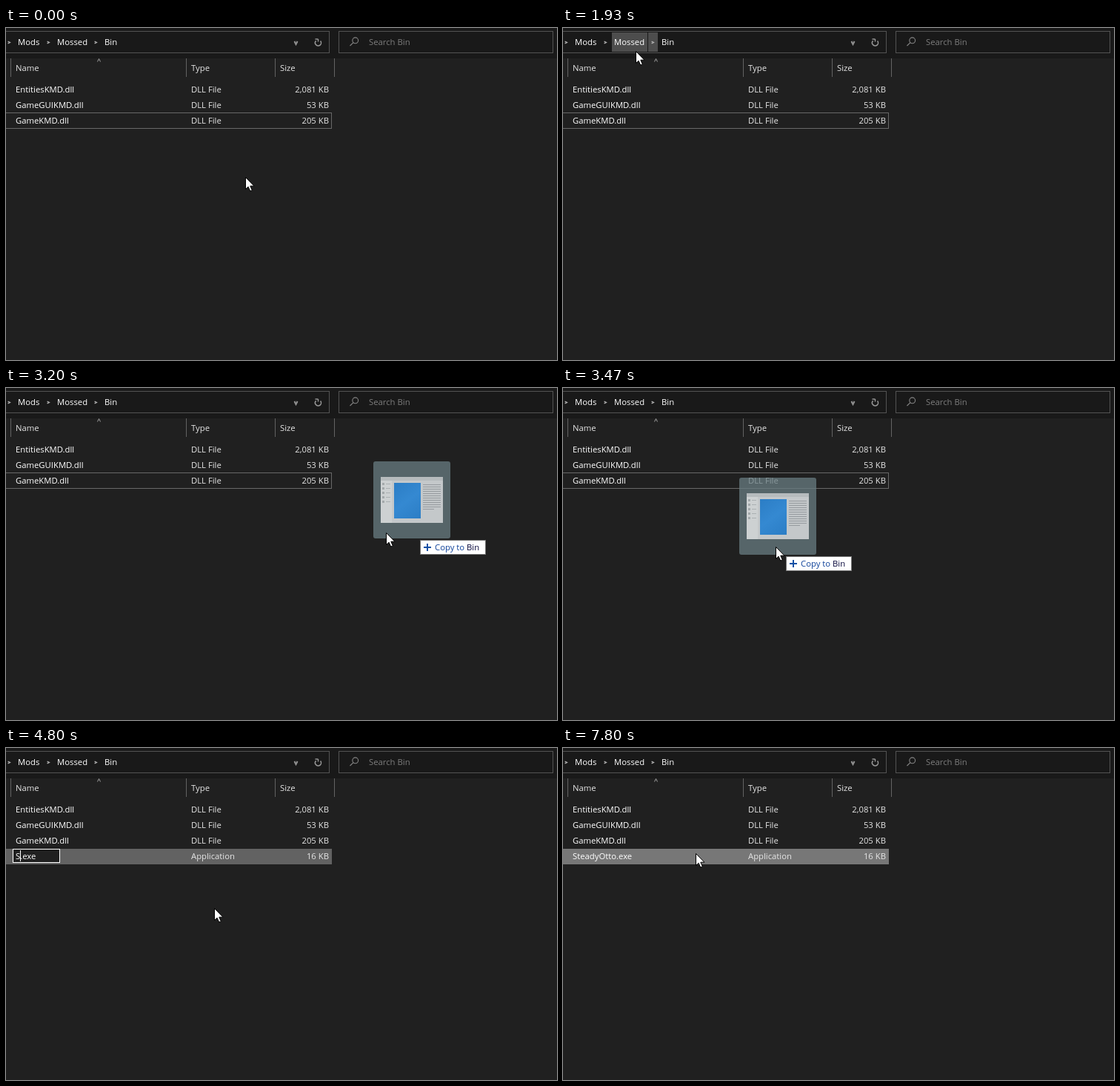
Animation of 744 by 448 pixels, one loop 8 s. Source, as an HTML page with a canvas:

```html
<!DOCTYPE html>
<html lang="en">
<head>
<meta charset="utf-8">
<title>File explorer</title>
<style>
  html, body { margin: 0; width: 744px; height: 448px; overflow: hidden; background: #202020; }
  canvas { display: block; }
</style>
</head>
<body>
<canvas id="stage" width="744" height="448"></canvas>
<script>
const ctx = document.getElementById('stage').getContext('2d', { alpha: false });
const LOOP = 8000, STEP = 1000 / 15;
const FAMILY = '11.3px "Open Sans", "Noto Sans", sans-serif';
const FOLDER = 'Mossed', DROPPED = 'SteadyOttoStart', TYPED = 'SteadyOtto';
const DRAG = 3000, DROP = 3795, RENAME = 4325, COMMIT = 6595;
const DRAG_LAG = 22, ROW = 21, FIRST_ROW = 73;
const LIGHT = '#e6e6e6', HOVER = '#4d4d4d';

const FILES = [
  ['EntitiesKMD.dll', 'DLL File', '2,081 KB'],
  ['GameGUIKMD.dll', 'DLL File', '53 KB'],
  ['GameKMD.dll', 'DLL File', '205 KB']
];

// Characters arrive evenly within each burst of typing.
const KEY_GAP = 400 / 3;
const BURSTS = [
  { from: 4795, to: 5395, keys: 5 },
  { from: 5595, to: 5795, keys: 2 },
  { from: 6130, to: 6395, keys: 3 }
];

const linear = k => k;
const easeOut = k => 1 - (1 - k) ** 1.5;
const easeInOut = k => k * k * (3 - 2 * k);

// Each move starts where the previous one ended; bend pulls the path into a curve.
const HOME = { x: 323, y: 201 };
const MOVES = [
  { from: 400, to: 1270, x: 384, y: 57, bend: -217 },
  { from: 1270, to: 1930, x: 98, y: 31, ease: easeOut },
  { from: 1930, to: 2133, x: 88, y: 22 },
  { from: 2133, to: 2267, x: 1136, y: 150 },
  { from: 2267, to: DRAG, x: 849, y: 167 },
  { from: DRAG, to: 3440, x: 287, y: 214, ease: easeOut },
  { from: 3480, to: 3740, x: 281, y: 216 },
  { from: 7340, to: 7800, x: 179, y: 142, ease: easeInOut }
];

function pointerAt(t) {
  let { x, y } = HOME;
  for (const m of MOVES) {
    if (t < m.from) break;
    const k = (m.ease || linear)(Math.min(1, (t - m.from) / (m.to - m.from)));
    x += (m.x - x) * k;
    y += (m.y - y) * k + 2 * k * (1 - k) * (m.bend || 0);
    if (t < m.to) break;
  }
  return { x: Math.round(x), y: Math.round(y) };
}

function rect(x, y, w, h, color) {
  ctx.fillStyle = color;
  ctx.fillRect(x, y, w, h);
}

function frame(x, y, w, h, color) {
  ctx.strokeStyle = color;
  ctx.lineWidth = 1;
  ctx.strokeRect(x + 0.5, y + 0.5, w - 1, h - 1);
}

function text(str, x, y, color = '#fff', align = 'left') {
  ctx.fillStyle = color;
  ctx.textAlign = align;
  ctx.fillText(str, x, y);
}

function chevron(x, y, dx, dy, color, width) {
  // The arms lie across the pointing direction (dx, dy).
  ctx.strokeStyle = color;
  ctx.lineWidth = width;
  ctx.beginPath();
  ctx.moveTo(x - dx - dy, y - dy - dx);
  ctx.lineTo(x + dx, y + dy);
  ctx.lineTo(x - dx + dy, y - dy + dx);
  ctx.stroke();
}

function arc(x, y, r, start, end, color, width) {
  ctx.strokeStyle = color;
  ctx.lineWidth = width;
  ctx.beginPath();
  ctx.arc(x, y, r, start, end);
  ctx.stroke();
}

function line(x0, y0, x1, y1, color, width) {
  ctx.strokeStyle = color;
  ctx.lineWidth = width;
  ctx.beginPath();
  ctx.moveTo(x0, y0);
  ctx.lineTo(x1, y1);
  ctx.stroke();
}

function crumbHover(p, x, width) {
  if (p.y >= 6 && p.y < 33 && p.x >= x && p.x < x + width) rect(x, 6, width, 26, HOVER);
}

function addressBar(p) {
  rect(0, 0, 744, 41, '#191919');
  frame(-5, 4, 442, 30, '#535353');
  frame(449, 4, 290, 30, '#535353');
  crumbHover(p, 66, 62);
  crumbHover(p, 129, 26);
  rect(114, 6, 1, 26, '#191919');

  [4, 57, 121].forEach(x => chevron(x, 19.5, 1.4, 0, '#b4b4b4', 1.3));
  text('Mods', 16, 23);
  text(FOLDER, 69, 23);
  text('Bin', 133, 23);

  chevron(391.5, 20, 0, 2, '#8c8c8c', 1.8);
  chevron(391.5, 20, 0, 2, '#8c8c8c', 1.8);
  arc(421.5, 20, 4, -0.7, Math.PI * 1.25, '#9a9a9a', 1.5);
  line(417.5, 15, 421.5, 15, '#9a9a9a', 1.4);
  line(421.5, 15, 421.5, 18.5, '#9a9a9a', 1.4);

  arc(471.7, 16.8, 3.9, 0, Math.PI * 2, '#858585', 1.1);
  line(469, 19.6, 464.5, 24, '#858585', 1.1);
  text('Search Bin', 490, 23, '#7d7d7d');
}

function columnHeads() {
  [6, 243, 363, 443].forEach(x => rect(x, 41, 1, 25, '#636363'));
  chevron(125.5, 43.5, 0, -2, '#a0a0a0', 1);
  text('Name', 13, 58, LIGHT);
  text('Type', 250, 58, LIGHT);
  text('Size', 370, 58, LIGHT);
}

function fileRow([name, type, size], index) {
  const y = FIRST_ROW + 14 + index * ROW;
  text(name, 13, y);
  text(type, 250, y, LIGHT);
  text(size, 436, y, LIGHT, 'right');
}

function typedCount(t) {
  return BURSTS.reduce((sum, b) => {
    const keys = t < b.from ? 0 : 1 + Math.floor((t - b.from) / KEY_GAP);
    return sum + Math.min(keys, b.keys);
  }, 0);
}

function renameBox(t) {
  const count = typedCount(t);
  const stem = count ? TYPED.slice(0, count) : DROPPED;
  const stemWidth = ctx.measureText(stem).width;
  const width = Math.round(ctx.measureText(stem + '.exe').width + 37);
  rect(9, 136, width, 19, '#202020');
  frame(9, 136, width, 19, '#fff');
  if (!count) rect(13, 138, stemWidth, 15, '#0078d7');
  text(stem + '.exe', 13, 150);
  if (count) rect(Math.round(13 + stemWidth), 138, 1, 15, '#fff');
}

function fileList(t, p) {
  const hovered = Math.floor((p.y - FIRST_ROW) / ROW);
  if (t < DRAG && p.x < 440 && FILES[hovered]) {
    rect(0, FIRST_ROW + hovered * ROW, 440, ROW - 1, HOVER);
  }
  FILES.forEach(fileRow);

  if (t < DROP) {
    frame(-2, 114, 442, 22, '#686868');
    return;
  }
  const renaming = t >= RENAME && t < COMMIT;
  rect(0, 136, 440, ROW, renaming ? '#626262' : '#777');
  const name = renaming ? '' : (t < RENAME ? DROPPED : TYPED) + '.exe';
  fileRow([name, 'Application', '16 KB'], FILES.length);
  if (renaming) renameBox(t);
}

function dragImage(x, y) {
  ctx.save();
  ctx.translate(x, y);
  ctx.globalAlpha = 0.75;
  ctx.fillStyle = '#687c82';
  ctx.beginPath();
  ctx.roundRect(0, 0, 104, 104, 3);
  ctx.fill();

  ctx.globalAlpha = 0.82;
  rect(10, 21, 84, 62, '#dddfe0');
  rect(10, 21, 84, 5, '#b4b9bb');
  rect(10, 26, 15, 57, '#d0d3d5');
  for (let i = 0; i < 5; i++) {
    rect(12, 29 + i * 6, 3, 3, '#9aa0a3');
    rect(17, 30 + i * 6, 6, 1, '#a4aaad');
  }
  const blue = ctx.createLinearGradient(28, 29, 64, 77);
  blue.addColorStop(0, '#0a6dc4');
  blue.addColorStop(0.5, '#157bd3');
  blue.addColorStop(1, '#0a6dc4');
  rect(28, 29, 36, 48, blue);
  for (let i = 0; i < 12; i++) rect(67, 31 + i * 3, i === 11 ? 15 : 24, 1, '#8d9296');
  ctx.restore();
}

function dragLabel(x, y) {
  rect(x, y, 89, 20, '#fff');
  frame(x, y, 89, 20, '#767676');
  rect(x + 5, y + 9, 10, 2, '#1450a5');
  rect(x + 9, y + 5, 2, 10, '#1450a5');
  text('Copy to ', x + 20, y + 14, '#0f429a');
  text('Bin', x + 20 + ctx.measureText('Copy to ').width, y + 14, '#08083c');
}

function pointer({ x, y }) {
  ctx.save();
  ctx.translate(x + 0.5, y + 0.5);
  ctx.fillStyle = '#fff';
  ctx.strokeStyle = '#000';
  ctx.lineWidth = 1;
  const arrow = new Path2D('M0 0V16L3.6 12.7L6.2 18.6L8.8 17.4L6.3 11.7H11.4Z');
  ctx.fill(arrow);
  ctx.stroke(arrow);
  ctx.restore();
}

function draw(now) {
  const t = Math.floor(((now % LOOP) + 4) / STEP) * STEP;
  const p = pointerAt(t);
  ctx.font = '500 ' + FAMILY;
  rect(0, 0, 744, 448, '#202020');
  addressBar(p);
  columnHeads();
  fileList(t, p);

  if (t >= DRAG && t < DROP) {
    const trail = pointerAt(t - DRAG_LAG);
    dragImage(trail.x - 49, trail.y - 93);
    dragLabel(trail.x + 14, trail.y + 13);
  }
  // Sustained typing hides the pointer.
  const hidden = BURSTS.some(b => t >= Math.max(b.from, b.to - 335) && t < b.to);
  if (!hidden) pointer(p);
}

const start = performance.now();
function tick() {
  draw(performance.now() - start);
  requestAnimationFrame(tick);
}
tick();
</script>
</body>
</html>
```
